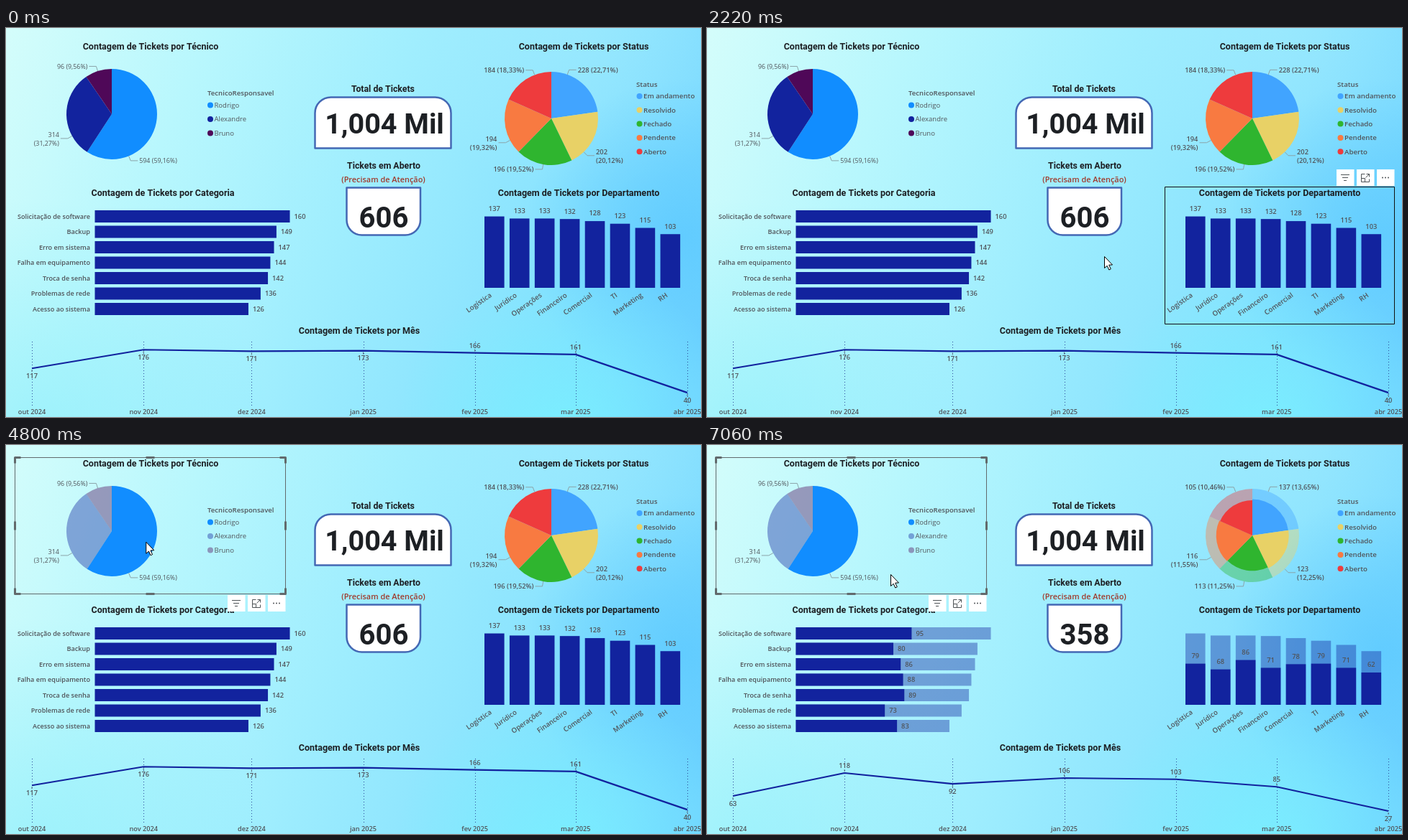
Recreate the animation shown at these times as an HTML page with a canvas. Size 966 by 542 pixels, loop 8000 ms.

```html
<!DOCTYPE html>
<html lang="pt">
<head>
<meta charset="utf-8">
<title>Painel de Tickets</title>
<style>
html, body { margin: 0; width: 100%; height: 100%; overflow: hidden; }
canvas { display: block; }
</style>
</head>
<body>
<canvas id="stage" width="966" height="542"></canvas>
<script>
const ctx = document.getElementById('stage').getContext('2d');
const W = 966, H = 542, LOOP = 8000, TOTAL = 1004;
const NAVY = '#12239e', GREY = '#50545a', FRAME = '#626a6c', DIM = 0.4;
const SELECT = 4600, RELABEL = 5420, SHRINK = 6170;

// all: full count, part: count under the selected slice, angle: label direction in degrees from the top
const technicians = [
  { name: 'Rodrigo', all: 594, part: 594, color: '#118dff', angle: 158 },
  { name: 'Alexandre', all: 314, part: 0, color: NAVY, angle: 241 },
  { name: 'Bruno', all: 96, part: 0, color: '#4f0858', angle: 342 }
];
const statuses = [
  { name: 'Em andamento', all: 228, part: 137, color: '#41a4ff', angle: 20 },
  { name: 'Resolvido', all: 202, part: 123, color: '#e8d166', angle: 136 },
  { name: 'Fechado', all: 196, part: 113, color: '#2fb52f', angle: 190 },
  { name: 'Pendente', all: 194, part: 116, color: '#f87a41', angle: 242 },
  { name: 'Aberto', all: 184, part: 105, color: '#ee3b3d', angle: 339 }
];

const series = rows => rows.split(', ').map(row => {
  const [, name, all, part] = row.match(/(.+) (\d+)\/(\d+)/);
  return { name, all: +all, part: +part };
});
const categories = series('Solicitação de software 160/95, Backup 149/80, Erro em sistema 147/86, ' +
  'Falha em equipamento 144/88, Troca de senha 142/89, Problemas de rede 136/73, Acesso ao sistema 126/83');
const departments = series('Logística 137/79, Jurídico 133/68, Operações 133/86, Financeiro 132/71, ' +
  'Comercial 128/78, TI 123/79, Marketing 115/71, RH 103/62');
const months = series('out 2024 117/63, nov 2024 176/118, dez 2024 171/92, jan 2025 173/106, ' +
  'fev 2025 166/103, mar 2025 161/85, abr 2025 40/27');

// the time axis is true to scale: 911 px for 182 days
const firstDay = Date.UTC(2024, 9, 1);
months.forEach((m, i) => {
  m.x = 36 + (Date.UTC(2024, 9 + i, 1) - firstDay) / 864e5 * 911 / 182;
});

// pointer moves: start, end, x, y
const moves = [
  [500, 1120, 705, 341], [1320, 1700, 932, 340], [1700, 2080, 724, 322],
  [2150, 2220, 552, 318], [2550, 2960, 235, 167], [2960, 3230, 192, 131],
  [3430, 4040, 182, 138], [4180, 4940, 197, 134], [6170, 6360, 176, 179],
  [6710, 7060, 255, 180]
];

const mix = (a, b, p) => a + (b - a) * p;
const clamp = p => Math.min(1, Math.max(0, p));
const percent = v => `(${(v / TOTAL * 100).toFixed(2).replace('.', ',')}%)`;
const between = (t, a, b) => t >= a && t < b;

function text(str, x, y, { size = 9.3, weight = 600, family = '"Open Sans"', color = GREY, align = 'left' } = {}) {
  ctx.font = `${weight} ${size}px ${family}, sans-serif`;
  ctx.textAlign = align;
  ctx.fillStyle = color;
  ctx.fillText(str, x, y + size * 0.36);
}

function heading(str, x, y, size = 12.5) {
  text(str, x, y, { size, weight: 700, family: 'Roboto', color: '#1d2024', align: 'center' });
}

function polyline(points, color, width = 1) {
  ctx.beginPath();
  points.forEach(([x, y]) => ctx.lineTo(x, y));
  ctx.strokeStyle = color;
  ctx.lineWidth = width;
  ctx.stroke();
}

function dot(x, y, color, r = 4) {
  ctx.fillStyle = color;
  ctx.beginPath();
  ctx.arc(x, y, r, 0, Math.PI * 2);
  ctx.fill();
}

function faded(alpha, draw) {
  ctx.globalAlpha = alpha;
  draw();
  ctx.globalAlpha = 1;
}

function glow(x, y, r, rgb, alpha) {
  const g = ctx.createRadialGradient(x, y, 0, x, y, r);
  g.addColorStop(0, `rgba(${rgb},${alpha})`);
  g.addColorStop(1, `rgba(${rgb},0)`);
  ctx.fillStyle = g;
  ctx.fillRect(0, 0, W, H);
}

function background() {
  const base = ctx.createLinearGradient(0, 0, 966, 420);
  ['#d4fdfb', '#b8f7fd', '#a0eefe', '#8ae3fe', '#70d3ff']
    .forEach((color, i) => base.addColorStop(i / 4, color));
  ctx.fillStyle = base;
  ctx.fillRect(0, 0, W, H);
  glow(800, -20, 260, '170,238,255', 0.4);
  glow(940, 290, 220, '90,200,255', 0.75);
  glow(780, 570, 240, '122,244,255', 0.8);
  glow(40, 570, 330, '130,236,250', 0.5);
}

function sliceLabel(cx, cy, r, angle, value, style) {
  const a = angle * Math.PI / 180, sin = Math.sin(a), cos = Math.cos(a);
  const side = Math.sign(sin), x = cx + (r + 7) * sin, y = cy - (r + 7) * cos;
  polyline([[cx + r * sin, cy - r * cos], [x, y], [x + side * 10, y]], '#8ba3a8');
  const font = { ...style, align: side > 0 ? 'left' : 'right' };
  const tx = x + side * 12;
  if (Math.abs(sin) > 0.6) {
    text(value, tx, y - 5.5, font);
    text(percent(value), tx, y + 6.5, font);
  } else text(`${value} ${percent(value)}`, tx, y, font);
}

// drawSlice gets each item and a function that fills its wedge at a radius
function pie(cx, cy, items, drawSlice) {
  let from = -Math.PI / 2;
  items.forEach(item => {
    const start = from, end = from += item.all / TOTAL * Math.PI * 2;
    drawSlice(item, r => {
      ctx.fillStyle = item.color;
      ctx.beginPath();
      ctx.moveTo(cx, cy);
      ctx.arc(cx, cy, r, start, end);
      ctx.fill();
    });
  });
}

function technicianChart(selected) {
  const thin = { size: 8.9, weight: 400 };
  const alpha = d => selected && !d.part ? DIM : 1;
  pie(147, 120, technicians, (d, wedge) => faded(alpha(d), () => wedge(63)));
  text('TecnicoResponsavel', 280, 91, { size: 9.65 });
  technicians.forEach((d, i) => {
    const y = 107.5 + i * 19.5;
    sliceLabel(147, 120, 63, d.angle, d.all, thin);
    faded(alpha(d), () => dot(284, y, d.color));
    text(d.name, 289.5, y, { size: 9.5, weight: 400 });
  });
}

function statusChart(shown, p) {
  pie(758, 126, statuses, (d, wedge) => {
    if (p > 0) faded(DIM, () => wedge(65));
    wedge(65 * mix(1, Math.sqrt(d.part / d.all), p));
  });
  text('Status', 876, 78.5, { size: 9.7 });
  statuses.forEach((d, i) => {
    const y = 95 + i * 19.3;
    sliceLabel(758, 126, 65, d.angle, d[shown]);
    dot(880.5, y, d.color);
    text(d.name, 886, y, { size: 9.7 });
  });
}

function bar({ all, part }, p, rect) {
  ctx.fillStyle = NAVY;
  if (p > 0) faded(DIM, () => ctx.fillRect(...rect(all)));
  ctx.fillRect(...rect(mix(all, part, p)));
}

function categoryChart(shown, p) {
  categories.forEach((d, i) => {
    const x = 123.5, y = 254 + i * 21.5, scale = 1.694;
    bar(d, p, v => [x, y, v * scale, 17]);
    text(d.name, 117, y + 8.5, { size: 9.1, align: 'right' });
    text(d[shown], x + d[shown] * scale + 6, y + 8.5);
  });
}

function departmentChart(shown, p) {
  departments.forEach((d, i) => {
    const x = 665 + i * 34.93, base = 362, scale = 0.726, mid = x + 13.8;
    bar(d, p, v => [x, base, 27.6, -v * scale]);
    text(d[shown], mid, base - d[shown] * scale - 11, { align: 'center' });
    ctx.save();
    ctx.translate(mid - 5, 371);
    ctx.rotate(-35 * Math.PI / 180);
    text(d.name, 0, 0, { size: 9.6, align: 'right' });
    ctx.restore();
  });
}

function monthChart(shown, p) {
  const scales = { all: 0.44, part: 0.582 };
  const height = (m, key) => 525.7 - m[key] * scales[key];
  ctx.setLineDash([1, 3]);
  months.forEach(({ x }) => polyline([[Math.round(x) + 0.5, 437], [Math.round(x) + 0.5, 528]], '#2b4a9c'));
  ctx.setLineDash([]);
  ctx.lineJoin = 'round';
  polyline(months.map(m => [m.x, mix(height(m, 'all'), height(m, 'part'), p)]), NAVY, 2.2);
  months.forEach((m, i) => {
    const y = height(m, shown);
    const near = [months[i - 1], months[i + 1]].filter(Boolean);
    const mean = near.reduce((sum, n) => sum + n[shown], 0) / near.length;
    // labels go above peaks, unless too close to the top
    const side = y > 452 && m[shown] > mean - 2 ? -1 : 1;
    polyline([[m.x, y + side * 2], [m.x, y + side * 5]], '#5c6b78');
    text(m[shown], m.x, y + side * 10.5, { align: 'center' });
    text(m.name, m.x, 535, { size: 9.2, align: 'center' });
  });
}

function card(x, y, w, h, radii) {
  ctx.beginPath();
  ctx.roundRect(x, y, w, h, radii);
  ctx.fillStyle = '#fff';
  ctx.fill();
  ctx.strokeStyle = '#4468b4';
  ctx.lineWidth = 2.5;
  ctx.stroke();
}

function cards(relabelled) {
  card(429.5, 96.5, 189, 71, [22, 22, 0, 0]);
  card(473.5, 222.5, 102.5, 66, [0, 0, 21, 21]);
  heading('1,004 Mil', 526, 133, 39.5);
  heading(relabelled ? '358' : '606', 525, 264, 40);
  heading('Total de Tickets', 524, 85, 12.3);
  heading('Tickets em Aberto', 525, 192, 12.3);
  text('(Precisam de Atenção)', 524.5, 211, { size: 10.9, color: '#a03a2c', align: 'center' });
}

function titles() {
  const title = (name, x, y) => heading('Contagem de Tickets por ' + name, x, y);
  title('Técnico', 201, 25);
  title('Status', 803, 25);
  title('Categoria', 218, 229);
  title('Departamento', 796, 229);
  title('Mês', 491, 421);
}

function frame(x, y, w, h, color = '#111') {
  ctx.strokeStyle = color;
  ctx.lineWidth = 1;
  ctx.strokeRect(x + 0.5, y + 0.5, w, h);
}

function handles(x, y, w, h) {
  for (const i of [-1, 0, 1]) for (const j of [-1, 0, 1]) {
    const cx = x + w * (i + 1) / 2, cy = y + h * (j + 1) / 2;
    if (i && j) polyline([[cx - i * 8, cy], [cx, cy], [cx, cy - j * 8]], FRAME, 3);
    else if (j) polyline([[cx - 6, cy], [cx + 6, cy]], FRAME, 3);
    else if (i) polyline([[cx, cy - 6], [cx, cy + 6]], FRAME, 3);
  }
}

function toolbar(x, y) {
  const ink = '#505558';
  ctx.fillStyle = '#fff';
  for (let i = 0; i < 3; i++) ctx.fillRect(x + i * 28, y, 24.5, 23);
  for (let i = 0; i < 3; i++) {
    const half = 6 - i * 2, ly = y + 7.5 + i * 4;
    polyline([[x + 12 - half, ly], [x + 12 + half, ly]], ink);
    dot(x + 64 + i * 4, y + 11.5, ink, 1);
  }
  const bx = x + 34.5, by = y + 6.5;
  polyline([[bx + 5, by], [bx, by], [bx, by + 11], [bx + 11, by + 11], [bx + 11, by + 7]], ink);
  polyline([[bx + 7, by], [bx + 11, by], [bx + 11, by + 4]], ink);
  polyline([[bx + 11, by], [bx + 6, by + 5]], ink);
  polyline([[bx, by + 6], [bx + 5, by + 6], [bx + 5, by + 11]], ink);
}

function pointer(t) {
  if (t < moves[0][0]) return;
  let x = 850, y = 542;
  for (const [start, end, toX, toY] of moves) {
    const p = clamp((t - start) / (end - start));
    x = mix(x, toX, p);
    y = mix(y, toY, p);
  }
  ctx.save();
  ctx.translate(x + 0.5, y + 0.5);
  ctx.fillStyle = '#fff';
  ctx.strokeStyle = '#000';
  ctx.lineWidth = 1;
  const arrow = new Path2D('M0 0V16L3.7 12.8 6.3 18.5 8.8 17.3 6.2 11.7 11 11.5Z');
  ctx.fill(arrow);
  ctx.stroke(arrow);
  ctx.restore();
}

// eases out in three visible steps
function shrink(t) {
  const p = clamp(Math.floor((t - SHRINK) / 95 + 1) / 3);
  return 1 - (1 - p) ** 2;
}

function render(t) {
  const selected = t >= SELECT, relabelled = t >= RELABEL, p = shrink(t);
  const shown = relabelled ? 'part' : 'all';
  background();
  technicianChart(selected);
  statusChart(shown, p);
  categoryChart(shown, p);
  departmentChart(shown, p);
  monthChart(shown, p);
  cards(relabelled);
  if (between(t, 3100, SELECT)) toolbar(308, 209);
  titles();
  if (between(t, 640, 900)) frame(12, 413, 944, 128);
  if (between(t, 900, 2290)) {
    frame(636, 221, 319, 191);
    toolbar(875, 197);
  }
  if (t >= 2800) frame(12, 17, 376, 190, selected ? FRAME : '#111');
  if (selected) {
    handles(12.5, 17.5, 376, 190);
    toolbar(308, 209);
  }
  pointer(t);
}

function tick() {
  render(performance.now() % LOOP);
  requestAnimationFrame(tick);
}
tick();
</script>
</body>
</html>
```
